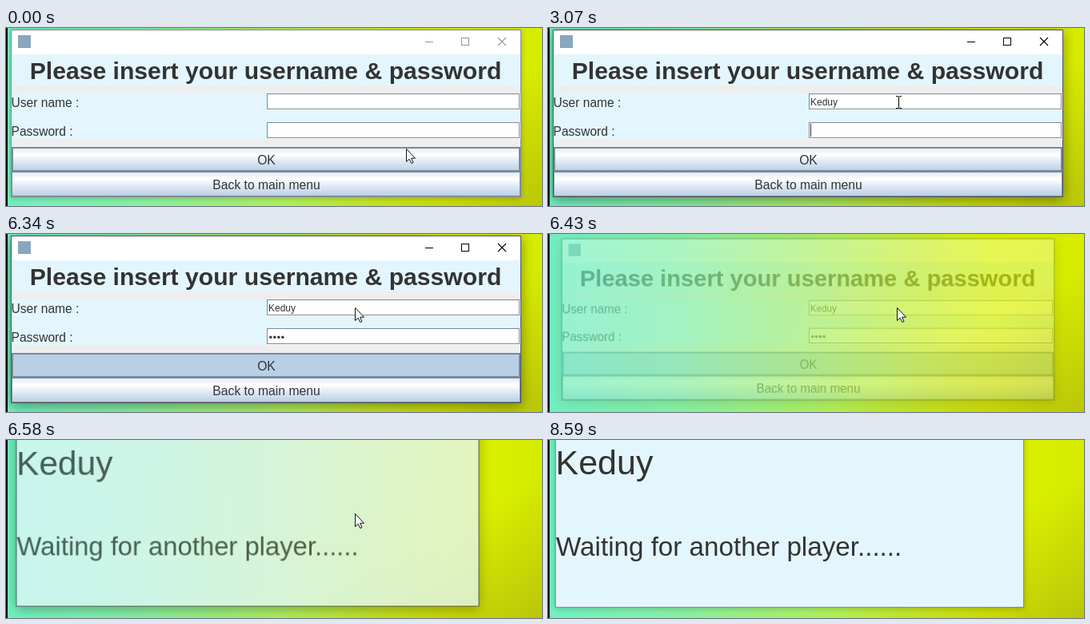
An HTML page with a canvas that plays this animation: 670x223 px, repeating every 8.67 s.

```html
<!DOCTYPE html>
<html lang="en">
<head>
<meta charset="utf-8">
<title>Login</title>
<style>
  html, body { margin: 0; width: 100%; height: 100%; overflow: hidden; }
  canvas { display: block; }
</style>
</head>
<body>
<canvas id="stage" width="670" height="223"></canvas>
<script>
const W = 670, H = 223, LOOP = 8670, MARGIN = 40;
const USER = 'Keduy';
const FONT = '"Liberation Sans", Arial, sans-serif';
const PALE = '#e4f6fd', INK = '#333', EDGE = '#7a8a99';
const NAME_KEYS = [670, 1600, 2060, 2460, 2690, 2840];
const PASS_KEYS = [3070, 4080, 4860, 5180, 5560];
const SUBMIT = 6340, CLOSING = 6430, OPENING = 6500;
const LOGIN = [6, 2, 638, 210], WAITING = [9, -MARGIN, 586, 210 + MARGIN];

const screen = document.getElementById('stage').getContext('2d');
const layer = document.createElement('canvas');
layer.width = W;
layer.height = H + MARGIN;
const pane = layer.getContext('2d');

const mix = (a, b, p) => a + (b - a) * p;
const grey = v => `rgb(${v},${v},${v})`;
// Last row [time, ...values] that has begun
const held = (rows, t) => rows.filter(r => r[0] <= t).pop();

function box(c, x, y, w, h, color) {
  c.fillStyle = color;
  c.fillRect(x, y, w, h);
}

function frame(c, x, y, w, h, color, width = 1) {
  c.strokeStyle = color;
  c.lineWidth = width;
  c.strokeRect(x + width / 2, y + width / 2, w - width, h - width);
}

function text(str, x, y, size, align = 'left', weight = '') {
  pane.font = `${weight} ${size}px ${FONT}`;
  pane.textAlign = align;
  pane.fillStyle = INK;
  pane.fillText(str, x, y);
}

function gradient(c, x0, y0, x1, y1, stops) {
  const g = c.createLinearGradient(x0, y0, x1, y1);
  stops.forEach(([at, color]) => g.addColorStop(at, color));
  return g;
}

function wallpaper() {
  box(screen, 0, 0, W, H, gradient(screen, 0, 0, W, 30, [
    [0, '#70f0c2'], [0.25, '#86f0a4'], [0.5, '#a9ef66'],
    [0.7, '#c8ee28'], [0.84, '#dcf200'], [1, '#d6ec00']]));
  box(screen, 0, 0, W, H, gradient(screen, 600, 80, 690, 240, [
    [0, 'rgba(150,150,20,0)'], [1, 'rgba(150,150,20,0.5)']]));
}

function field(y) {
  box(pane, 326, y, 317, 21, '#fff');
  frame(pane, 326, y, 316, 20, EDGE);
}

function button(label, y, edge, pressed) {
  pane.save();
  pane.translate(7, y);
  box(pane, 0, 0, 636, 31, pressed ? '#b8cfe5' : gradient(pane, 0, 0, 0, 31, [
    [0, '#dde8f3'], [0.3, '#fff'], [0.6, '#dde8f3'], [1, '#b8cfe5']]));
  frame(pane, 0, 0, 636, 31, EDGE, edge);
  pane.restore();
  text(label, 325.5, y + 22, 15.7, 'center');
}

function titleControls(color) {
  box(pane, 524, 17, 10, 1, color);
  frame(pane, 569, 12, 10, 10, color);
  pane.lineWidth = 1.1;
  pane.beginPath();
  pane.moveTo(615, 12);
  pane.lineTo(625, 22);
  pane.moveTo(625, 12);
  pane.lineTo(615, 22);
  pane.stroke();
}

function loginWindow(t, active) {
  frame(pane, ...LOGIN, grey(Math.round(mix(140, 85, active))));
  box(pane, 7, 3, 636, 208, '#eee');
  box(pane, 7, 3, 636, 30, '#fff');
  box(pane, 15, 9, 16, 16, '#86a7bf');
  if (t < CLOSING) titleControls(grey(Math.round(mix(150, 0, active))));
  box(pane, 7, 33, 636, 39, PALE);
  box(pane, 7, 82, 636, 57, PALE);
  text('Please insert your username & password', 324.5, 64, 30.15, 'center', 'bold');
  text('User name :', 6.5, 99, 15.6);
  text('Password :', 6.5, 135, 15.6);
  field(82);
  field(118);
  button('OK', 149, 2, t >= SUBMIT);
  button('Back to main menu', 180, 1);

  const typed = keys => Math.max(0, keys.filter(k => k <= t).length - 1);
  const name = USER.slice(0, typed(NAME_KEYS));
  text(name, 328, 97, 12);
  const dots = typed(PASS_KEYS);
  for (let i = 0; i < dots; i++) {
    pane.beginPath();
    pane.arc(330.8 + 5 * i, 129.2, 1.7, 0, 7);
    pane.fill();
  }

  const lastKey = [...NAME_KEYS, ...PASS_KEYS].filter(k => k <= t).pop();
  if (t - lastKey < 550) {
    const inPass = t >= PASS_KEYS[0];
    const offset = inPass ? 5 * dots : Math.round(pane.measureText(name).width);
    box(pane, 328 + offset, inPass ? 120 : 84, 1, 16, INK);
  }
}

function waitingWindow(active) {
  box(pane, ...WAITING, grey(active ? 85 : 140));
  box(pane, 10, -MARGIN, 584, 209 + MARGIN, PALE);
  text(USER, 9.5, 43, 43);
  text('Waiting for another player......', 10, 145, 33.2);
}

// Paints a window at a scale about (cx, cy); its shadow falls only outside it
function show(paint, rect, alpha, scale, cx, cy, active) {
  pane.setTransform(1, 0, 0, 1, 0, 0);
  pane.clearRect(0, 0, W, H + MARGIN);
  pane.translate(0, MARGIN);
  paint();

  screen.save();
  screen.globalAlpha = alpha;
  screen.translate(cx, cy);
  screen.scale(scale, scale);
  screen.translate(-cx, -cy);

  screen.save();
  screen.beginPath();
  screen.rect(-W, -H, 3 * W, 3 * H);
  screen.rect(...rect);
  screen.clip('evenodd');
  screen.shadowColor = `rgba(0,0,0,${mix(0.25, 0.42, active)})`;
  screen.shadowBlur = mix(7, 15, active);
  screen.shadowOffsetY = mix(1, 3, active);
  box(screen, ...rect, '#000');
  screen.restore();

  screen.drawImage(layer, 0, -MARGIN);
  screen.restore();
}

function pointerAt(t) {
  if (t < 7280) {
    return held([[0, 500, 151], [70, 487, 139], [140, 462, 116],
      [210, 443, 98], [280, 436, 92]], t).slice(1);
  }
  if (t < 8200) {
    const u = Math.min(11, Math.floor((t - 7280) / 77)) / 11, v = 1 - u;
    const curve = (a, b, c) => Math.round(a * v * v + 2 * b * u * v + c * u * u);
    return [curve(464, 607, 581), curve(124, 165, 205)];
  }
  return held([[8200, 579, 211], [8280, 576, 217], [8360, 576, 240]], t).slice(1);
}

function pointer(t) {
  const [x, y] = pointerAt(t);
  screen.save();
  screen.translate(x, y);
  if (t >= 510 && t < SUBMIT) {
    box(screen, 2, -6, 1, 14, '#000');
    for (const end of [-7, 8]) {
      box(screen, -1, end, 3, 1, '#000');
      box(screen, 3, end, 3, 1, '#000');
    }
  } else {
    const tip = new Path2D('M.5 .5V16.5L4.2 13.2 6.7 18.5 9 17.5 6.6 12.2H11.5Z');
    screen.fillStyle = '#fff';
    screen.fill(tip);
    screen.strokeStyle = '#111';
    screen.lineWidth = 1;
    screen.stroke(tip);
  }
  screen.restore();
}

function draw(t) {
  wallpaper();
  if (t < OPENING) {
    const active = t < 510 ? 0 : Math.min(1, Math.floor((t - 510) / 77 + 1) / 5);
    const [, alpha, scale] = held([[0, 1, 1], [CLOSING, 0.32, 0.966]], t);
    show(() => loginWindow(t, active), LOGIN, alpha, scale, 325, 107, active);
  } else {
    const active = t < 8590 ? 1 : 0;
    const [, alpha, scale] = held([[OPENING, 0.3, 0.96], [6580, 0.76, 0.988],
      [6660, 0.95, 0.997], [6730, 1, 1]], t);
    show(() => waitingWindow(active), WAITING, alpha, scale, 300, 95, active);
  }
  box(screen, 0, 0, 2, H, '#000');
  pointer(t);
}

const start = performance.now();
function tick() {
  draw((performance.now() - start) % LOOP);
  requestAnimationFrame(tick);
}
tick();
</script>
</body>
</html>
```
